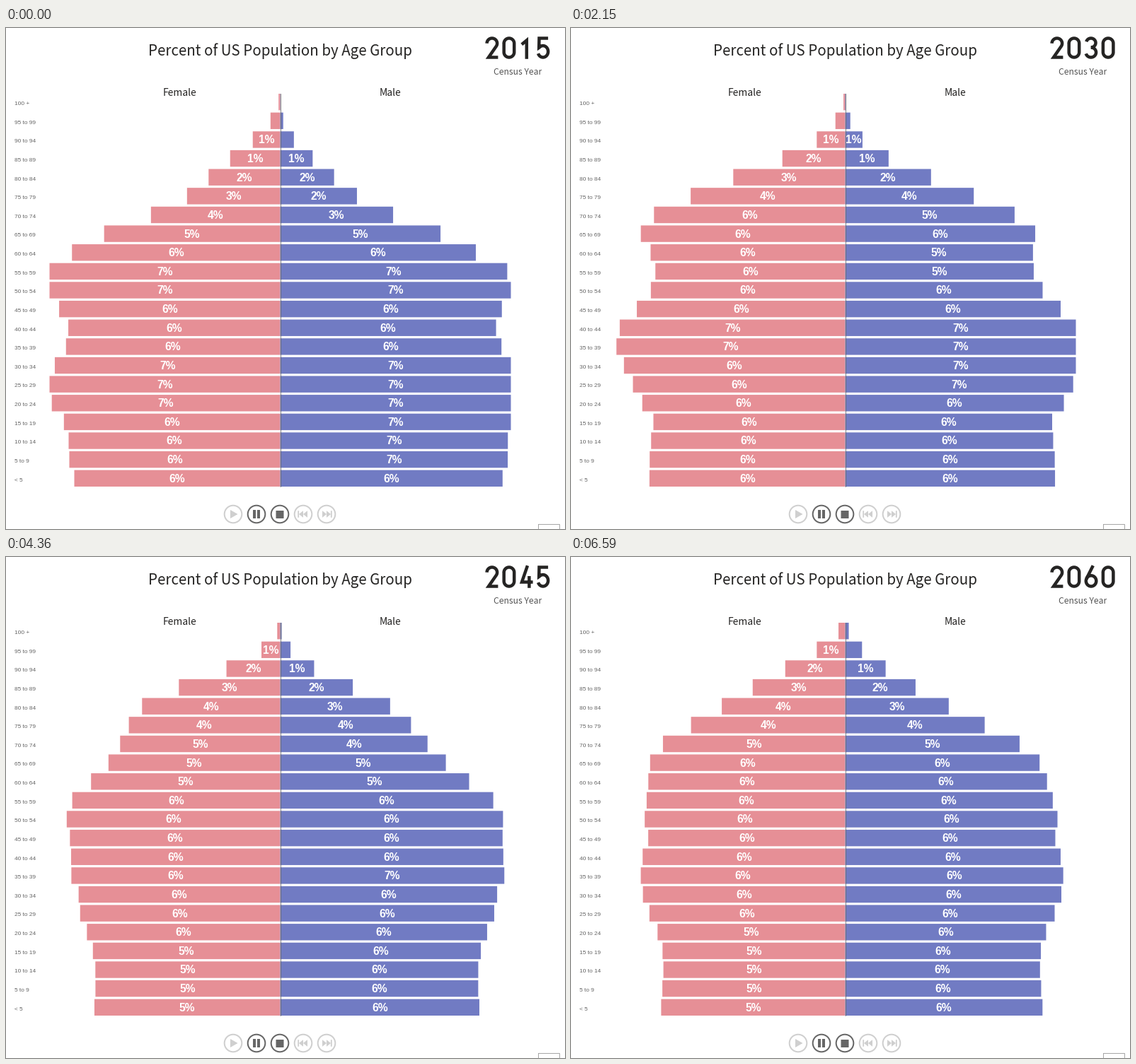
A matplotlib script that plays this animation: 790x709 px, repeating every 8.08 s.

```python
import numpy as np
import matplotlib.pyplot as plt
from matplotlib.animation import FuncAnimation
from matplotlib.patches import Circle, Polygon, Rectangle

W, H, DPI = 790, 709, 100
LOOP, STEP = 8080, 40
AXIS, TOP, PITCH, BAR_H = 387.5, 93, 26.63, 23.4
MAX_W, PX_PER_PCT, MIN_LABEL_W = 326, 48.62, 24
PINK, BLUE, INK, DARK, PALE = "#e68f96", "#717bc3", "#252423", "#666666", "#cfcfcf"
HUMANIST, GROTESK = "Noto Sans CJK JP", "Liberation Sans"

YEARS = list(range(2015, 2061, 5))
STARTS = [0, 610, 1350, 2100, 2840, 3620, 4360, 5110, 5850, 6590]
SOFT, SOFT_MS = {1, 2, 3, 4, 8}, 50  # changes that pass through a halfway step
AGE = np.arange(21)  # five-year groups, youngest first


# Population model; sizes are bar lengths in pixels
def bump(x, center, width):
    return np.exp(-((x - center) / width) ** 2)


def mortality(level, slope):
    """Gompertz law: the death rate grows exponentially with age."""
    return level * np.exp(slope * (AGE - 18))


def births(n):
    return 260 + 31 * bump(n, 0, 3.8)


def project(start, newborn, deaths):
    """Age every cohort by one group per census."""
    rows = [start]
    for n in range(len(YEARS) - 1):
        migration = 0.045 * bump(AGE, 4, 1.8)
        growth = migration - 0.032 + 0.003 * n - deaths * (1 - 0.03 * n)
        aged = (rows[-1] * np.exp(growth))[:-1]
        rows.append(np.append(newborn * births(n + 1), aged))
    return np.minimum(rows, MAX_W)


def women_2015(deaths, slope):
    older = 160 + 138 / (1 + np.exp((AGE - 13.75) / 0.55))
    booms = 52 * bump(AGE, 10.5, 1.44) + 35 * bump(AGE, 4.9, 1.55)
    women = (older + booms) * np.exp(-deaths / (np.exp(slope) - 1))
    women[0] = births(0)
    return women


f_deaths, m_deaths = mortality(1.04, 0.55), mortality(1.18, 0.48)
women = women_2015(f_deaths, 0.55)
men = women * 1.08 * np.exp(-0.0009 * AGE ** 2 - mortality(0.48, 0.65))


# Digits of the big year as strokes, y pointing down
def arc(cx, cy, rx, ry, start, end):
    a = np.radians(np.linspace(start, end, 40))
    return list(zip(cx + rx * np.cos(a), cy + ry * np.sin(a)))


GAP = [(np.nan, np.nan)]
DIGITS = {
    "0": arc(7.25, 7.25, 7.25, 7.25, 180, 360)
    + arc(7.25, 19.75, 7.25, 7.25, 0, 180) + [(0, 7.25), (0, 7)],
    "1": [(1, 8.8), (8, 3), (8, 29.3)],
    "2": arc(7.25, 7.25, 7.25, 7.25, 180, 395) + [(2.4, 27), (15.8, 27)],
    "3": arc(7, 6.5, 6.7, 6.5, 195, 450) + arc(7, 20, 7.25, 7, 270, 525),
    "4": [(9.2, -2.3), (1.2, 21), (16.8, 21)] + GAP + [(11.6, 12.5), (11.6, 29.3)],
    "5": [(14.2, 0), (1.6, 0), (1.3, 13.4)] + arc(7, 18.8, 7.25, 8.2, 225, 520),
    "6": [(10, -2.3)] + arc(7.25, 19.4, 7.25, 7.6, 205, 565),
}

fig = plt.figure(figsize=(W / DPI, H / DPI), dpi=DPI, facecolor="white")
ax = fig.add_axes([0, 0, 1, 1])
ax.set(xlim=(0, W), ylim=(H, 0))
ax.axis("off")


def pt(px):
    return px * 72 / DPI


def text(x, y, s, px, color, font=HUMANIST, ha="center", **kw):
    return ax.text(x, y, s, fontsize=pt(px), color=color, family=font,
                   ha=ha, va="baseline", **kw)


def box(x, y, w, h, color):
    return ax.add_patch(Rectangle((x, y), w, h, fc=color, lw=0, snap=False))


def triangle(x, y, w, h, color):
    ax.add_patch(Polygon([(x, y - h), (x, y + h), (x + w, y)], fc=color, lw=0))


def controls(y=688):
    for x, color in zip(range(321, 454, 33), (PALE, DARK, DARK, PALE, PALE)):
        ax.add_patch(Circle((x, y), 12.3, fc="none", ec=color, lw=pt(2)))
    triangle(317, y, 10.5, 6, PALE)
    for x in (349, 355):
        box(x, y - 6, 4, 12, DARK)
    box(381.5, y - 5, 11, 11, DARK)
    for x, d in ((420, -1), (453, 1)):
        triangle(x - 6 * d, y, 6 * d, 4.8, PALE)
        triangle(x, y, 6 * d, 4.8, PALE)
        box(x + 6.8 * d - 0.9, y - 4.8, 1.8, 9.6, PALE)


text(387.5, 39, "Percent of US Population by Age Group", 20.5, INK)
text(245.5, 96, "Female", 13.9, INK)
text(543, 96, "Male", 13.9, INK)
text(723, 66.5, "Census Year", 12.1, "#555555")
controls()
ax.add_patch(Rectangle((751.5, 701.5), 30, 20, fc="none", ec="#a6a6a6", lw=pt(1)))

tops = TOP + PITCH * AGE[::-1]
names = ["< 5"] + [f"{a} to {a + 4}" for a in range(5, 100, 5)] + ["100 +"]
for name, y in zip(names, tops):
    text(12, y + 16, name, 8.3, DARK, GROTESK, "left")


def make_side(widths, sign, color):
    bars = [box(AXIS, y, 0, BAR_H, color) for y in tops]
    tags = [text(AXIS, y + 17.1, "", 15.6, "white", GROTESK, weight="bold")
            for y in tops]
    return widths, sign, bars, tags


sides = [make_side(project(women, 1, f_deaths), -1, PINK),
         make_side(project(men, 1.072, m_deaths), 1, BLUE)]
ax.plot([AXIS, AXIS], [TOP, tops[0] + BAR_H], color=DARK, lw=pt(0.8))
digits = [ax.plot([], [], color=INK, lw=pt(4.5), solid_capstyle="butt",
                  solid_joinstyle="miter")[0] for _ in range(4)]


def show_year(year):
    for i, (line, d) in enumerate(zip(digits, str(year))):
        x, y = np.array(DIGITS[d]).T
        line.set_data(x + 679.6 + 24.1 * i, y + 14.5)


def show_bars(side, widths):
    _, sign, bars, tags = side
    for w, bar, tag in zip(widths, bars, tags):
        bar.set_width(sign * w)
        tag.set_x(AXIS + sign * w / 2)
        tag.set_text(f"{w / PX_PER_PCT:.0f}%" if w > MIN_LABEL_W else "")


def update(i):
    t = i * STEP + STEP - 10
    n = int(np.searchsorted(STARTS, t, side="right")) - 1
    halfway = n in SOFT and t < STARTS[n] + SOFT_MS
    show_year(YEARS[n])
    for side in sides:
        widths = side[0][n]
        if halfway:
            widths = (widths + side[0][n - 1]) / 2
        show_bars(side, widths)
    return []


anim = FuncAnimation(fig, update, frames=LOOP // STEP, interval=STEP,
                     repeat=True, repeat_delay=0, blit=False)
plt.show()
```
